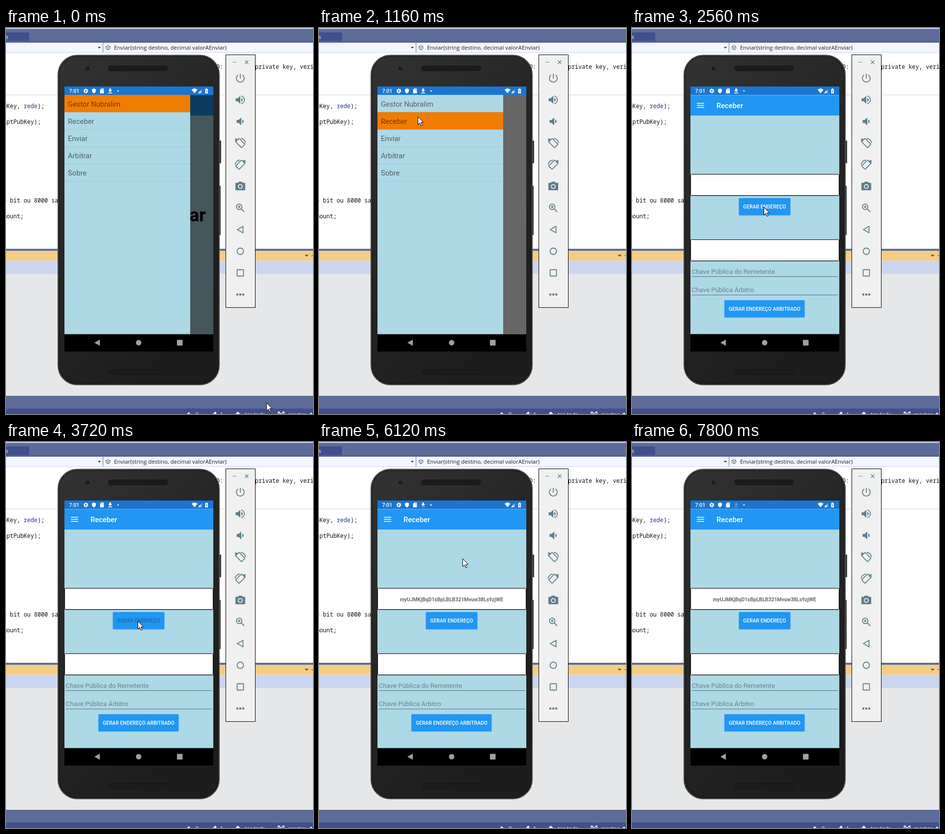
These frames come from a looping animation (625 by 785 pixels, 7.89 s). An HTML page:

```html
<!DOCTYPE html>
<html lang="pt">
<head>
<meta charset="utf-8">
<title>Receber</title>
<style>
  html, body { margin: 0; width: 100%; height: 100%; overflow: hidden; }
  svg { display: block; width: 625px; height: 785px; }
  text { white-space: pre; }
  .ui { font: 11.4px "Open Sans", sans-serif; }
  .code { font: 11.7px "Noto Sans Mono", monospace; }
  .app { font-family: Roboto, sans-serif; }
  .bar { font-size: 14.74px; font-weight: 500; fill: #fff; }
  .item { font-size: 14.74px; fill: #000; fill-opacity: .54; }
  .hint { font-size: 13.3px; fill: #000; fill-opacity: .4; }
  .btn { font-size: 10.35px; font-weight: 500; fill: #fff; text-anchor: middle; }
  .tool * { vector-effect: none; }
  .line { fill: none; stroke: #5f7f8c; stroke-width: 1.8; }
  .solid { fill: #5f7f8c; }
</style>
</head>
<body>
<svg viewBox="0 0 625 785" xmlns="http://www.w3.org/2000/svg">
  <defs>
    <linearGradient id="shell" x1="0" y1="0" x2=".5" y2="1">
      <stop offset="0" stop-color="#333"/>
      <stop offset=".4" stop-color="#282828"/>
      <stop offset="1" stop-color="#1d1d1d"/>
    </linearGradient>
    <pattern id="mesh" width="3" height="3" patternUnits="userSpaceOnUse">
      <rect width="3" height="3" fill="#161616"/>
      <rect width="1.3" height="1.3" fill="#303030"/>
    </pattern>
    <clipPath id="screen"><rect x="119" y="136" width="303" height="486.5"/></clipPath>
    <clipPath id="filled"><rect id="fill" x="207" y="122" width="10" height="0"/></clipPath>
    <path id="down" d="M210.6 123h3v3.6h2.4l-3.9 3.9-3.9-3.9h2.4zM208 131.4h8.2v1.5H208z"/>
  </defs>

  <!-- editor window -->
  <rect width="625" height="785" fill="#fff"/>
  <rect width="625" height="30" fill="#5d6b99"/>
  <rect width="625" height="2" fill="#c9d3ef"/>
  <rect y="9" width="47" height="17.5" fill="#40508d"/>
  <rect y="26.5" width="625" height="1.5" fill="#40508d" opacity=".5"/>
  <text class="ui" x="-1" y="21.5" fill="#fff">s</text>
  <rect y="30" width="625" height="20" fill="#f3f6fe"/>
  <rect y="49.5" width="625" height="1" fill="#ccd5f0"/>
  <rect x="196" y="30" width="3" height="20" fill="#b9c5e6"/>
  <path d="M187 38.5h6l-3 3.2z" fill="#1e1e1e"/>
  <path d="M203.5 37.5l4-2.2 4 2.2v4.6l-4 2.3-4-2.3zl4 2.2 4-2.2M207.500 39.700v4.600" fill="none" stroke="#555"/>
  <text class="ui" x="220" y="44" fill="#1e1e1e">Enviar(string destino, decimal valorAEnviar)</text>
  <rect y="135" width="625" height="2" fill="#e8e8ec"/>
  <g class="code" fill="#111">
    <text x="407" y="83">TODO:</text>
    <text x="507" y="83">private key, verificar</text>
    <text x="-6" y="163">bKey, <tspan fill="#1f377f">rede</tspan>);</text>
    <text x="-6" y="195">iptPubKey);</text>
    <text x="-6" y="355">0 bit ou 8000 sats</text>
    <text x="-6" y="387">mount;</text>
  </g>
  <rect y="449" width="625" height="4" fill="#5d6b99"/>
  <rect y="453" width="625" height="20.500" fill="#f5cc84"/>
  <path d="M608 461h8l-4 4.200z" fill="#6b5a35"/>
  <rect x="622" y="462.500" width="3" height="1.200" fill="#6b5a35"/>
  <rect y="473.500" width="625" height="26.500" fill="#ccd5f0"/>
  <rect y="500" width="625" height="248" fill="#e6e7e8"/>
  <rect y="748" width="625" height="26" fill="#5d6b99"/>
  <rect y="774" width="625" height="11" fill="#40508d"/>
  <g class="ui" fill="#fff">
    <path d="M367 787l5-6 5 6zM419 787l7-7 3 3-4 4zM465 787l7-7 7 7z" opacity=".9"/>
    <path d="M554 786v-5h4M563 781h3v4M556 782l4 4M566 780l-6 5" fill="none" stroke="#fff" stroke-width="1.500"/>
    <text x="386" y="790">0</text>
    <text x="436" y="790">1</text>
    <text x="486" y="790">tcc-tads</text>
    <text x="574" y="790">master</text>
    <path d="M617 786l4-4 4 4z"/>
  </g>

  <!-- phone -->
  <path d="M434 229h4v46h-4zM434 321h3v100h-3z" fill="#3c3c3c"/>
  <rect x="106" y="55.500" width="328" height="670" rx="39" fill="url(#shell)" stroke="#4a4a4a" stroke-width="2"/>
  <rect x="108.500" y="58" width="323" height="665" rx="37" fill="none" stroke="#161616"/>
  <circle cx="166" cy="82.500" r="4.500" fill="#141414" stroke="#3b3b3b"/>
  <circle cx="166" cy="82.500" r="1.500" fill="#333"/>
  <rect x="209" y="77" width="120" height="10" rx="4" fill="url(#mesh)" stroke="#151515"/>
  <rect x="210" y="694.500" width="120" height="10" rx="4" fill="url(#mesh)" stroke="#151515"/>
  <rect x="119" y="119" width="303" height="539" fill="#000"/>

  <g class="app">
    <rect x="119" y="119" width="303" height="17.500" fill="#1976d2"/>
    <g fill="#fff">
      <text x="128.500" y="132" font-size="10.600" font-weight="500">7:01</text>
      <circle cx="162.500" cy="128" r="2.700" fill="none" stroke="#fff" stroke-width="2"/>
      <circle cx="162.500" cy="128" r="4.200" fill="none" stroke="#fff" stroke-width="1.400" stroke-dasharray="2.200"/>
      <path d="M179 123l4 1.600v3q0 3.600-4 5.400-4-1.800-4-5.400v-3zM194 123h5.200v10h-7.700v-7.500z"/>
      <path d="M194.500 124.500v2M196.200 124.500v2M197.800 124.500v2" stroke="#1976d2" stroke-width=".7"/>
      <use href="#down" opacity=".3"/>
      <use href="#down" clip-path="url(#filled)"/>
      <circle cx="228" cy="128" r="1.500"/>
      <path d="M377.800 125.500q6-5 12 0l-6 7.300z"/>
      <path d="M391 132.500l8-8.500v8.500z" opacity=".4"/>
      <path d="M391 132.500l5-5.300v5.300zM405.500 124.300h1.500v-1.300h2.500v1.300h1.500v8.700h-5.500z"/>
      <path d="M408.600 125.500l-1.700 3.500h1.300v2.500l1.700-3.500h-1.300z" fill="#1976d2"/>
    </g>

    <g clip-path="url(#screen)">
      <rect id="back" x="119" y="136" width="303" height="487" fill="#add8e6"/>
      <rect id="toolbar" x="119" y="136.500" width="303" height="41.500" fill="#2196f3"/>
      <text id="send" x="373.500" y="393" font-size="37" font-weight="700">ar</text>
      <g id="receive">
        <path d="M132 153h15M132 157.200h15M132 161.400h15" stroke="#fff" stroke-width="1.500"/>
        <text class="bar" x="172" y="163">Receber</text>
        <g id="boxes"></g>
        <text id="address" x="269.800" y="323.500" text-anchor="middle" font-size="10.400" font-weight="700" fill="#6b6b6b">myUJMKjBqD1sBpLBLB321Mvuw38Ls9zjWE</text>
        <rect x="217.500" y="346.800" width="105" height="35" rx="2" opacity=".14"/>
        <rect id="button" x="217.500" y="345.800" width="105" height="35" rx="1.500" fill="#2196f3"/>
        <text id="label" class="btn" x="270" y="367.200">GERAR ENDEREÇO</text>
        <text class="hint" x="121.500" y="499.500">Chave Pública do Remetente</text>
        <text class="hint" x="121.500" y="537">Chave Pública Árbitro</text>
        <path d="M121.500 505.500h298M121.500 543h298" stroke="#000" stroke-opacity=".5"/>
        <rect x="188" y="554.500" width="163.500" height="35" rx="2" opacity=".14"/>
        <rect x="188" y="553.500" width="163.500" height="35" rx="1.500" fill="#2196f3"/>
        <text class="btn" x="270" y="575">GERAR ENDEREÇO ARBITRADO</text>
      </g>
      <rect id="scrim" x="119" y="136" width="303" height="487" opacity=".6"/>
      <g id="drawer">
        <rect x="119" y="136" width="256" height="487" fill="#add8e6"/>
        <rect id="chosen" x="119" y="136" width="256" height="35.200" fill="#f07c00"/>
        <g id="menu"></g>
      </g>
    </g>

    <g fill="#9da1a6">
      <path d="M180 640l11-6.300v12.600z"/>
      <circle cx="270" cy="640" r="5.500"/>
      <rect x="348" y="634.300" width="11.500" height="11.500" rx="1"/>
    </g>
  </g>

  <!-- emulator controls -->
  <rect x="447.500" y="54.500" width="60" height="514" fill="#f0f0f0" stroke="#000"/>
  <path d="M461 69.500h8" stroke="#8a9399" stroke-width="1.200"/>
  <path d="M486.500 66l7 7M493.500 66l-7 7" stroke="#5f7f8c" stroke-width="1.300"/>
  <g transform="translate(477 102)"><path class="line" d="M0-9V1M-4.600-6.400A8 8 0 1 0 4.600-6.400"/></g>
  <g transform="translate(477 146)">
    <path class="solid" d="M-9.500-3h4L0-8V8l-5.500-5h-4z"/>
    <path class="solid" d="M2-4q3 1.400 3 4t-3 4z"/>
    <path class="line" d="M2-7.800a8 8 0 0 1 0 15.600"/>
  </g>
  <g transform="translate(477 190)">
    <path class="solid" d="M-7.500-3h4L2-8V8l-5.500-5h-4zM4-4q3 1.400 3 4t-3 4z"/>
  </g>
  <g id="turn" transform="translate(477 234)">
    <rect class="line" x="-8.500" y="-5" width="17" height="10" rx="1" transform="rotate(45)"/>
    <path class="line" d="M1-9.500A10 10 0 0 1 10.500 0" stroke-width="1.300"/>
    <path class="solid" d="M-10.500-2v-7.500l5 1z"/>
  </g>
  <use href="#turn" transform="translate(954 44) scale(-1 1)"/>
  <g transform="translate(477 321.500)">
    <path class="solid" d="M-3-9h6l2 2.200h3.500q1.500 0 1.500 1.500V7q0 1.500-1.500 1.500h-17Q-10 8.500-10 7V-5.300q0-1.500 1.500-1.500H-5z"/>
    <circle cy=".8" r="4" fill="none" stroke="#f0f0f0" stroke-width="1.800"/>
  </g>
  <g transform="translate(477 366)">
    <circle class="line" cx="-2.300" cy="-2.300" r="5.600"/>
    <path class="line" d="M2 2l6 6" stroke-width="2.400"/>
    <path class="line" d="M-5-2.300H.4M-2.300-5V.4" stroke-width="1.200"/>
  </g>
  <path class="line" d="M471 410l11.500-6.500v13z" stroke-width="1.600"/>
  <circle class="line" cx="477" cy="454" r="6.500"/>
  <rect class="line" x="470.500" y="491.500" width="13" height="13" rx="1"/>
  <path class="solid" d="M469 540h4v4h-4zM475 540h4v4h-4zM481 540h4v4h-4z" rx="2"/>

  <path id="cursor" d="M.5.500v16l3.700-3.500 2.700 6 2.500-1.100-2.700-5.900h5z" fill="#fff" stroke="#000"/>
</svg>
<script>
const LOOP = 7890;
const $ = id => document.getElementById(id);
const set = (id, name, value) => $(id).setAttribute(name, value);
const show = (id, on) => set(id, "display", on ? "inline" : "none");

const ROW = 35.2;
$("menu").innerHTML = ["Gestor Nubralim", "Receber", "Enviar", "Arbitrar", "Sobre"].map((name, i) => {
  const y = 136 + ROW * i;
  return `<text class="item" x="126" y="${y + 23.6}">${name}</text>
    <rect x="119" y="${y + ROW - 0.7}" width="256" height="1" opacity=".07"/>`;
}).join("");
$("boxes").innerHTML = [297.5, 430.5].map(y =>
  `<rect x="119.5" y="${y + 1.5}" width="302" height="43" opacity=".25"/>
   <rect x="119.5" y="${y}" width="302" height="43" rx="1" fill="#fff" stroke="#000"/>`).join("");

// Pointer moves: first change, last change, number of steps, way points
const moves = [
  [70, 690, 9, [[530, 762], [400, 560], [240, 330], [169, 205], [201, 180]]],
  [1310, 1850, 8, [[201, 180], [240, 184], [300, 196], [331, 205], [331, 205]]],
  [2020, 2560, 8, [[331, 205], [318, 255], [285, 335], [268, 364]]],
  [5040, 5810, 11, [[268, 364], [285, 315], [310, 258], [308, 230]]],
  [5960, 6740, 11, [[308, 230], [299, 237], [225, 236], [182, 215], [215, 205]]],
  [6820, 7570, 11, [[215, 205], [150, 235], [260, 420], [430, 640], [515, 790]]]
];

function pointer(t) {
  const move = moves.filter(m => t >= m[0]).pop();
  if (!move) return moves[0][3][0];
  const [from, to, steps, points] = move;
  const step = Math.min(steps, 1 + Math.floor((t - from) / (to - from) * (steps - 1) + 0.01));
  const place = step / steps * (points.length - 1);
  const i = Math.min(Math.floor(place), points.length - 2);
  return points[i].map((v, axis) => Math.round(v + (points[i + 1][axis] - v) * (place - i)));
}

// Value of the last entry [time, value] reached
const at = (table, t) => table.filter(e => t >= e[0]).pop()[1];

const slide = [[0, 0], [1540, 60], [1620, 140], [1690, 200], [1765, 228], [1850, 256]];
const labelOpacity = [[0, 1], [3490, 0.6], [3570, 0]];
const refills = [70, 1390, 2790, 3950, 5260, 6550, 7800, 9080];
const levels = [0, 3, 5, 6.3, 8.6, 12];

function downloadLevel(t) {
  if (t < refills[0]) return 12;
  const i = refills.findIndex(r => r > t) - 1;
  const phase = (t - refills[i]) / (refills[i + 1] - refills[i]);
  return levels[Math.min(5, Math.floor(phase * 6 + 0.2))];
}

function draw(t) {
  const [x, y] = pointer(t);
  set("cursor", "transform", `translate(${x} ${y})`);
  show("cursor", t < 7570);

  const blank = t >= 920 && t < 1310;
  set("back", "fill", blank ? "#fff" : "#add8e6");
  show("toolbar", !blank);
  show("send", t < 920);
  show("receive", t >= 1310);

  const shift = at(slide, t);
  set("drawer", "transform", `translate(${-shift} 0)`);
  show("drawer", shift < 256);
  show("scrim", shift < 256);
  set("chosen", "y", t < 840 ? 136 : 136 + ROW);

  const off = t >= 3490 && t < 5040;
  const white = at(labelOpacity, t);
  set("button", "fill", t >= 3190 && t < 3720 ? "#45a6f4" : "#2196f3");
  $("label").style.fill = !off ? "#fff" : white ? "#a3cdf0" : "#1a68a8";
  show("address", t >= 5040);

  set("fill", "height", downloadLevel(t));
}

const start = performance.now();
function tick() {
  draw((performance.now() - start) % LOOP);
  requestAnimationFrame(tick);
}
tick();
</script>
</body>
</html>
```
